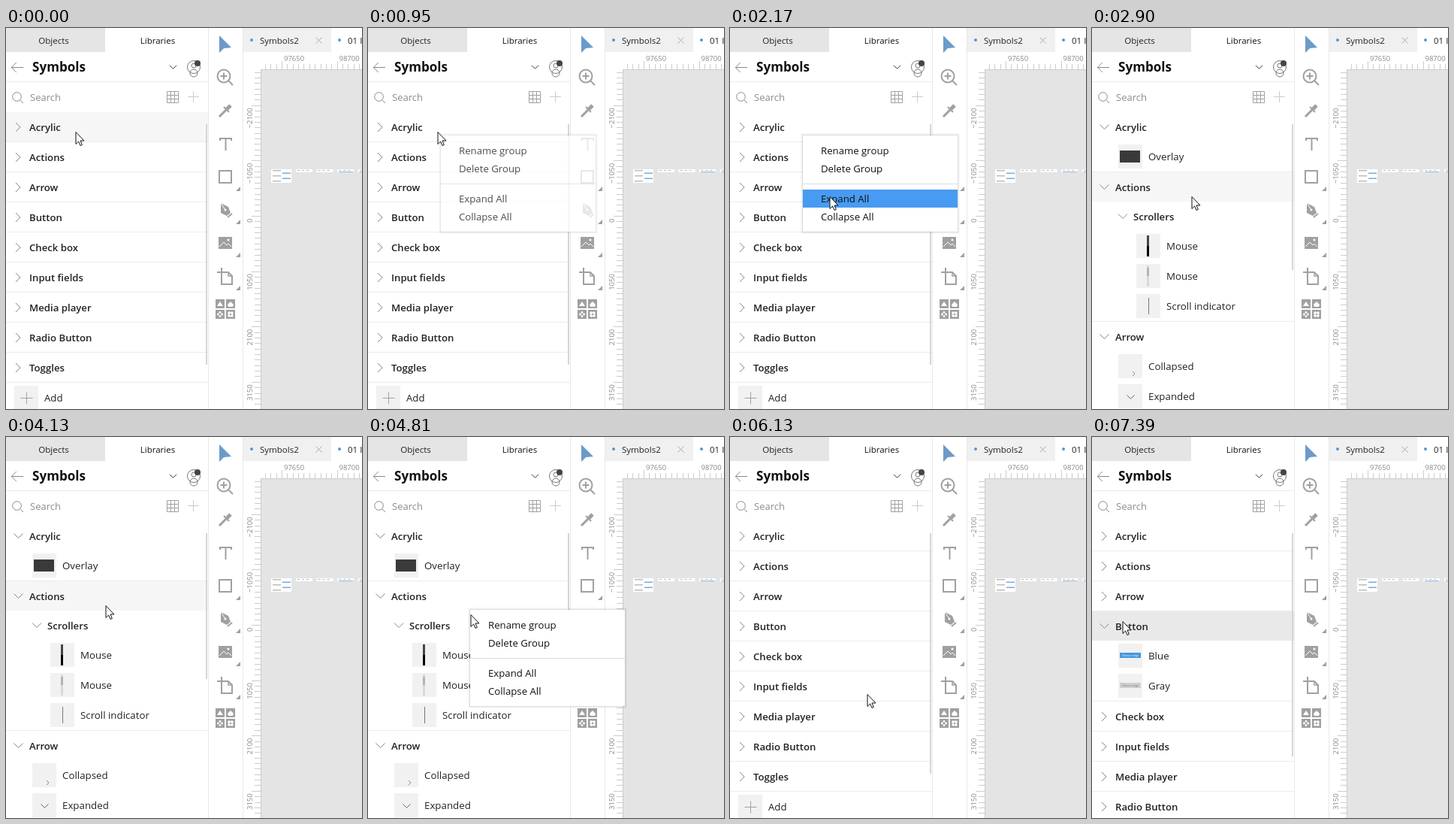
Write an HTML page with a canvas that moves like this. It is 474 px wide and 507 px high and loops after 8000 ms.

```html
<!DOCTYPE html>
<html lang="en">
<head>
<meta charset="utf-8">
<title>Symbol library</title>
<style>
  html, body { margin: 0; width: 100%; height: 100%; overflow: hidden; background: #fff; }
  canvas { display: block; }
</style>
</head>
<body>
<canvas id="stage" width="474" height="507"></canvas>
<script>
const ctx = document.getElementById('stage').getContext('2d');
const LOOP = 8000;
const FONT = '"Open Sans", "Noto Sans", sans-serif';
const GREY = '#a0a0a0', INK = '#222', TILE = '#f1f1f1', RULE = '#ececec', BLUE = '#6c9bc9';

// ---- drawing helpers ----
function rect(x, y, w, h, color) {
  ctx.fillStyle = color;
  ctx.fillRect(x, y, w, h);
}
function frame(x, y, w, h, color, width = 1) {
  ctx.strokeStyle = color;
  ctx.lineWidth = width;
  ctx.strokeRect(x, y, w, h);
}
function trace(points) {
  ctx.beginPath();
  points.forEach(([x, y]) => ctx.lineTo(x, y));
}
function line(points, color = GREY, width = 1) {
  trace(points);
  ctx.strokeStyle = color;
  ctx.lineWidth = width;
  ctx.stroke();
}
function poly(points, color = GREY) {
  trace(points);
  ctx.closePath();
  ctx.fillStyle = color;
  ctx.fill();
}
function disc(x, y, r, color = GREY) {
  ctx.beginPath();
  ctx.arc(x, y, r, 0, Math.PI * 2);
  ctx.fillStyle = color;
  ctx.fill();
}
function ring(x, y, r, color = GREY, width = 1) {
  ctx.beginPath();
  ctx.arc(x, y, r, 0, Math.PI * 2);
  ctx.strokeStyle = color;
  ctx.lineWidth = width;
  ctx.stroke();
}
function text(str, x, y, size, color = INK, weight = 400, align = 'left') {
  ctx.font = `${weight} ${size}px ${FONT}`;
  ctx.textAlign = align;
  ctx.fillStyle = color;
  ctx.fillText(str, x, y);
}
function plus(x, y, r, color, width) {
  line([[x - r, y], [x + r, y]], color, width);
  line([[x, y - r], [x, y + r]], color, width);
}
const chevronDown = (x, y, r, color = '#888', width) =>
  line([[x - r, y - r / 2], [x, y + r / 2], [x + r, y - r / 2]], color, width);
const chevronRight = (x, y, r, color = '#888', width) =>
  line([[x - r / 2, y - r], [x + r / 2, y], [x - r / 2, y + r]], color, width);

// ---- library panel ----
function swatch(y, back, fore) {
  rect(37, y - 4, 28, 7, back);
  text('Choose image', 51, y + 1, 3.4, fore, 400, 'center');
}
const ART = {
  overlay: y => rect(37, y - 8, 27, 16, '#3a3a3a'),
  dark: y => { rect(73, y - 14, 3, 14, '#444'); rect(73, y, 3, 14, '#000'); },
  light: y => { rect(73, y - 14, 3, 28, '#d8d8d8'); rect(73, y - 11, 3, 11, '#b4b4b4'); },
  hair: y => rect(75, y - 11, 1, 22, '#777'),
  right: y => chevronRight(55.5, y + 10, 3),
  down: y => chevronDown(51.5, y + 1, 5, '#666'),
  blue: y => swatch(y, '#4598dc', '#fff'),
  gray: y => swatch(y, '#cfcfcf', '#777'),
};
const GROUPS = ['Acrylic', 'Actions', 'Arrow', 'Button', 'Check box',
  'Input fields', 'Media player', 'Radio Button', 'Toggles'];
const CHILDREN = {
  Acrylic: [['Overlay', 'overlay']],
  Actions: [['Scrollers'], ['Mouse', 'dark', 24], ['Mouse', 'light', 24], ['Scroll indicator', 'hair', 24]],
  Arrow: [['Collapsed', 'right'], ['Expanded', 'down']],
  Button: [['Blue', 'blue'], ['Gray', 'gray']],
};

// Draws one entry below a group and returns its height.
function child([name, art, indent = 0], top) {
  const y = top + 19;
  if (!art) {
    chevronDown(41, y - 0.5, 6);
    text(name, 55, y + 5, 13.2, INK, 600);
    return 39;
  }
  rect(35 + indent, y - 16, 32, 32, TILE);
  ART[art](y);
  text(name, 75 + indent, y + 5, 13.3);
  return 40;
}

function tree(open, hover, hoverColor) {
  let top = 112;
  GROUPS.forEach((name, i) => {
    const y = top + 20;
    const kids = open.includes(name) ? CHILDREN[name] || [] : [];
    if (i === hover) rect(0, top, 269, 39, hoverColor);
    if (kids.length) chevronDown(16.5, y - 0.5, 6);
    else chevronRight(16, y, 6);
    text(name, 31, y + 5, 13.2, INK, 600);
    top += 40;
    kids.forEach(kid => { top += child(kid, top); });
    rect(0, top - 1, 269, 1, RULE);
  });
  rect(11, top + 4, 32, 32, TILE);
  plus(27.5, top + 20.5, 8);
  text('Add', 51, top + 25, 13.2);
}

function panelHeader() {
  rect(0, 0, 132, 32, '#e5e5e5');
  text('Objects', 63.5, 21, 11.6, INK, 400, 'center');
  text('Libraries', 202, 21, 11.5, '#111', 400, 'center');

  line([[7.5, 52.5], [23, 52.5]], '#888');
  chevronRight(10.5, 52.5, -6.5);
  text('Symbols', 35, 58, 17.1, '#111', 700);
  chevronDown(222.5, 52, 4.5, '#333');
  ring(250, 52, 8.5, '#777');
  ring(250, 50, 3, '#777');
  ring(250, 60, 5, '#777');
  disc(255, 47, 4, '#444');
  rect(0, 71, 269, 1, RULE);

  ring(14.5, 91.5, 5.8, '#888');
  line([[18.5, 95.5], [23, 100]], '#888');
  text('Search', 32, 97, 13, '#8c8c8c');
  for (let d = 0; d <= 15; d += 5) {
    line([[214.5 + d, 84.5], [214.5 + d, 99.5]]);
    line([[214.5, 84.5 + d], [229.5, 84.5 + d]]);
  }
  plus(249.5, 91.5, 7.5, '#ccc');
}

// ---- tool strip: each icon is drawn around its own centre ----
const TOOLS = [
  () => poly([[-8, -12], [8, 4], [-2, 5], [-8, 11]], BLUE),
  () => {
    ring(-2, -2, 8.5, GREY, 2);
    plus(-2, -2, 4.5, GREY, 2);
    line([[4, 4], [10, 10]], GREY, 2);
  },
  () => {
    line([[-8, 8], [1, -1]], GREY, 3);
    line([[-2, -5], [5, 2]], GREY, 2);
    line([[2, -2], [7, -7]], GREY, 5);
  },
  () => {
    line([[-7, -4], [-7, -7], [8, -7], [8, -4]], GREY, 2);
    line([[0.5, -7], [0.5, 9]], GREY, 2);
  },
  () => frame(-8, -8, 16, 16, GREY, 2),
  () => {
    poly([[-6, -9], [4, -4], [7, 4], [2, 8], [-6, 4]]);
    line([[-6, -9], [0, 0]], '#fff');
    disc(0, 0, 1.5, '#fff');
    line([[3, 10], [9, 5]], GREY, 2);
  },
  () => {
    rect(-9, -8, 18, 16, GREY);
    line([[-8, 5], [-2, -1], [2, 3], [4, 1], [8, 5]], '#fff');
    disc(4, -4, 1.5, '#fff');
  },
  () => {
    line([[-5, -11], [-5, 11], [9, 11], [9, 0], [4, -5], [-11, -5]], GREY, 2);
    line([[4, -5], [4, 0], [9, 0]], GREY, 1.5);
  },
  () => {
    for (let i = 0; i < 4; i++) rect(-13 + 14 * (i % 2), -13 + 14 * (i >> 1), 12, 12, GREY);
    poly([[-11, -4], [-7, -10], [-3, -4]], '#fff');
    poly([[3, -6], [7, -10], [11, -6], [10, -3], [4, -3]], '#fff');
    for (let a = 0; a < 4; a++) {
      const dx = Math.cos(a * Math.PI / 2) * 2.6, dy = Math.sin(a * Math.PI / 2) * 2.6;
      disc(-7 + dx, 7 + dy, 1.4, '#fff');
      disc(7 + (dx - dy) * 0.7, 7 + (dx + dy) * 0.7, 1.9, '#fff');
    }
    disc(7, 7, 1.2);
  },
];

function tools() {
  [269, 315].forEach(x => rect(x, 0, 1, 507, '#e8e8e8'));
  TOOLS.forEach((icon, i) => {
    ctx.save();
    ctx.translate(292, Math.round(22 + i * 44));
    icon();
    if (i > 3 && i < 8) poly([[20, 13], [20, 19], [14, 19]]);
    ctx.restore();
  });
}

// ---- document area ----
function tab(name, x) {
  disc(x - 11, 16, 2, '#5f93cc');
  text(name, x, 21, 11.5);
}

function rulers() {
  const step = 7.36;
  for (let i = -26; i < 35; i++) {
    const x = Math.round(367 + i * step), y = Math.round(250 + i * step);
    const size = i % 10 ? 7 : 11;
    if (x > 339) rect(x, 55 - size, 1, size, '#ccc');
    if (y > 55) rect(338 - size, y, size + 1, 1, '#ccc');
  }
  rect(339, 55, 135, 1, '#ccc');
  rect(339, 55, 1, 452, '#ccc');
  text('97650', 370, 44, 9.5, '#888');
  text('98700', 443.5, 44, 9.5, '#888');
  for (let k = -2; k <= 3; k++) {
    ctx.save();
    ctx.translate(328, 253.5 + k * step * 10);
    ctx.rotate(-Math.PI / 2);
    text(String(k * 1050).replace('-', '−'), 0, 0, 9.5, '#888', 400, 'right');
    ctx.restore();
  }
}

function artboards() {
  rect(353, 188, 27, 18, '#fff');
  for (let i = 0; i < 5; i++) {
    const sent = i % 2;
    rect(sent ? 368 : 355, 189 + i * 3.5, 11, 1.5, sent ? '#7baade' : '#bbb');
  }
  for (let i = 0; i < 4; i++) {
    const x = 386 + i * 27.6;
    rect(x, 188, 22, 4, '#fff');
    for (let d = 2; d < 20; d += 6) rect(x + d, 189, 3, 1, '#bbb');
    if (i > 1) rect(x + 2, 191, 19, 1, '#8fb8e2');
  }
}

function workspace() {
  rect(316, 0, 117, 32, '#f0f0f0');
  tab('Symbols2', 338);
  line([[412.5, 12.5], [420.5, 20.5]], '#aaa');
  line([[420.5, 12.5], [412.5, 20.5]], '#aaa');
  tab('01 Intro', 455);
  rect(340, 55, 134, 452, '#e4e4e4');
  rulers();
  artboards();
}

// ---- pointer: eased moves, held between ticks ----
const TICK = 50;
const MOVES = [
  { start: 1570, end: 2130, from: [92, 138], to: [132, 224] },
  { start: 4710, end: 5120, from: [131, 225], to: [182, 342] },
  { start: 6360, end: 6900, from: [182, 342], to: [40, 245] },
];
const CLICKS = [[460, 680], [2490, 2620], [4030, 4130], [5500, 5550], [7270, 7390]];
const within = (t, [from, to]) => t >= from && t < to;
const ease = u => u * u * u * (u * (u * 6 - 15) + 10);

function cursorAt(t) {
  const { start, end, from, to } = MOVES.filter(m => t >= m.start).pop() || MOVES[0];
  const held = Math.floor((t - start) / TICK) * TICK;
  const u = ease(Math.min(1, Math.max(0, held / (end - start))));
  return from.map((a, i) => Math.round(a + (to[i] - a) * u));
}

function pointer(t) {
  const [x, y] = cursorAt(t);
  const shape = [[0, 0], [0, 16], [3.6, 12.5], [6, 18], [8.3, 17], [6, 11.5], [11, 11.5]];
  ctx.save();
  ctx.translate(x + 1, y + 0.5);
  poly(shape, '#fff');
  ctx.strokeStyle = '#111';
  ctx.lineWidth = 1;
  ctx.stroke();
  ctx.restore();
  if (CLICKS.some(span => within(t, span))) disc(x, y, 12, 'rgba(255,255,0,.47)');
}

// ---- context menu ----
const MENUS = [
  { span: [830, 2850], x: 97, y: 143 },
  { span: [4330, 6130], x: 136, y: 230 },
];
const ITEMS = ['Rename group', 'Delete Group', '', 'Expand All', 'Collapse All'];

function drawMenu({ span, x, y }, t) {
  const [px, py] = cursorAt(t - TICK);
  ctx.save();
  ctx.globalAlpha = Math.min(1, (Math.floor((t - span[0]) / 45) + 1) / 4);
  rect(x, y, 206, 128, '#fff');
  for (let d = 0; d < 3; d++) {
    frame(x - d - 0.5, y - d - 0.5, 207 + 2 * d, 129 + 2 * d, `rgba(0,0,0,${0.13 / (1 + d * 1.5)})`);
  }
  let top = y + 8;
  ITEMS.forEach(name => {
    const height = name ? 24 : 16;
    if (!name) rect(x, top + 8, 206, 1, '#dcdcdc');
    else if (px >= x && py >= top && py < top + height) rect(x, top, 206, height, '#489bf2');
    text(name, x + 24, top + 17, 13.2, '#111');
    top += height;
  });
  ctx.restore();
}

// ---- scene ----
function hoveredRow(t) {
  if (t < 830) return 0;
  if (within(t, [2900, 4330])) return 1;
  return t >= 6400 ? Math.floor((cursorAt(t)[1] - 112) / 40) : -1;
}

function draw(t) {
  const all = within(t, [2850, 6130]), button = t >= 7390;
  rect(0, 0, 474, 507, '#fff');
  panelHeader();
  tree(all ? GROUPS : button ? ['Button'] : [], hoveredRow(t), button ? '#e9e9e9' : '#f6f6f6');
  rect(266, 128, 2, all ? 194 : button ? 297 : 320, '#d6d6d6');
  tools();
  workspace();
  MENUS.filter(m => within(t, m.span)).forEach(m => drawMenu(m, t));
  pointer(t);
}

function tick() {
  draw(performance.now() % LOOP);
  requestAnimationFrame(tick);
}
tick();
</script>
</body>
</html>
```
